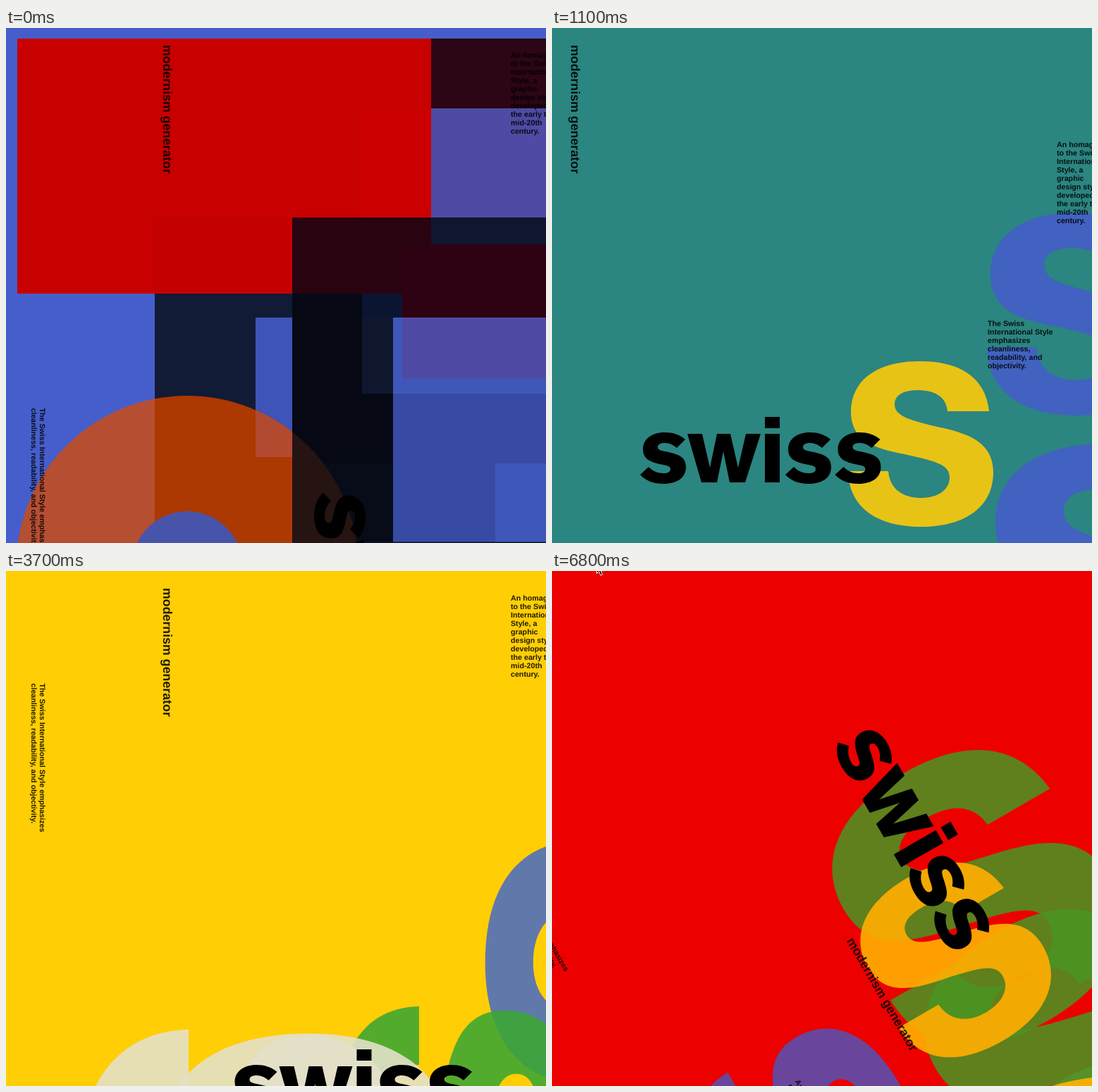
Animation, 766 px wide and 731 px high, one loop 6900 ms. Source, as an HTML page:

```html
<!DOCTYPE html>
<html lang="en">
<head>
<meta charset="utf-8">
<title>modernism generator</title>
<style>
html, body { margin: 0; width: 100%; height: 100%; overflow: hidden; }
svg { display: block; width: 100vw; height: 100vh; }
text {
  font: 700 10.68px "Liberation Sans", Arial, sans-serif;
  fill: #000; fill-opacity: .87; text-rendering: geometricPrecision; white-space: pre;
}
.title { font-size: 17.8px; }
.fade use { fill: inherit; }
</style>
</head>
<body>
<svg id="stage" viewBox="0 0 766 731" preserveAspectRatio="none">
  <defs>
    <path id="cap" d="M620 544C615 497 580 473 522 473C460 473 424 501 424 545C424 586 458 597 500 605C545 615 564 620 564 638C564 655 548 667 524 667C496 667 479 653 477 629L420 629C421 680 460 708 524 708C588 708 626 678 626 631C626 590 594 577 556 568C507 557 486 551 486 534C486 522 497 514 518 514C543 514 559 523 561 544Z"/>
    <path id="low" d="M64 10C56 3 46 0 35 0C16 0 4 10 4 24C4 38 15 42 28 45C39 47 43 48 43 52C43 56 39 58 33 58C25 58 18 55 12 49L0 60C8 69 20 73 33 73C53 73 65 64 65 49C65 34 53 31 40 28C30 26 25 25 25 21C25 17 29 15 35 15C42 15 47 18 52 22Z"/>
    <g id="word">
      <use href="#low" x="125" y="574"/>
      <path d="M192 576H213L224 624L234 576H253L264 624L275 576H296L274 645H252L243 601L234 645H212ZM302 576H323V645H302ZM302 552H323V568H302Z"/>
      <use href="#low" x="331" y="574"/>
      <use href="#low" x="401.500" y="574"/>
    </g>
  </defs>
</svg>
<script>
const LOOP = 6900;
const stage = document.getElementById('stage');

const homage = ['An homage', 'to the Swiss', 'International', 'Style, a', 'graphic',
  'design style', 'developed in', 'the early to', 'mid-20th', 'century.'];
const homageWide = ['An homage to the Swiss International Style, a',
  'graphic design style developed in the early to mid-', '20th century.'];
const about = ['The Swiss', 'International Style', 'emphasizes', 'cleanliness,',
  'readability, and', 'objectivity.'];
const aboutWide = ['The Swiss International Style emphasizes',
  'cleanliness, readability, and objectivity.'];

const rect = (x, y, r, b, fill) =>
  `<rect x="${x}" y="${y}" width="${r - x}" height="${b - y}" fill="${fill}"/>`;
const back = fill => rect(0, 0, 766, 731, fill);
const ess = (x, y, size, turn, fill, alpha = 1) =>
  `<use href="#cap" transform="translate(${x} ${y}) rotate(${turn}) scale(${size})" fill="${fill}" fill-opacity="${alpha}"/>`;
const word = (x, y, turn) =>
  `<use href="#word" role="img" aria-label="swiss" transform="translate(${x} ${y}) rotate(${turn}) translate(-157.5 -610.5)"/>`;
const para = (x, y, turn, lines) =>
  `<g transform="translate(${x} ${y}) rotate(${turn})">` +
  lines.map((line, i) => `<text y="${i * 12}">${line}</text>`).join('') + '</g>';
const title = (x, y) =>
  `<text class="title" transform="translate(${x} ${y}) rotate(90)">modernism generator</text>`;

// Overlapping blocks with a ring
function blocks() {
  const areas = [
    [16, 15, 603, 377, '#c80000'], [505, 114, 603, 269, '#cc0000'],
    [211, 269, 406, 377, '#c50000'],
    [603, 15, 766, 114, '#2c0516'], [603, 114, 766, 269, '#4f4aa3'],
    [406, 269, 603, 377, '#2a0310'], [603, 269, 766, 307, '#0f1630'],
    [211, 377, 406, 731, '#111b35'], [354, 411, 406, 609, '#3e54b8'],
    [406, 377, 549, 618, '#060914'], [406, 618, 549, 731, '#070c18'],
    [505, 377, 562, 411, '#0b1430'], [505, 411, 549, 519, '#0f172e'],
    [549, 411, 766, 731, '#4057ba'], [562, 307, 766, 411, '#2e0212'],
    [562, 411, 766, 498, '#4f4aa3'], [549, 519, 766, 618, '#374ba5'],
    [549, 618, 694, 731, '#374aa4'], [498, 729.5, 766, 731, '#0f1428']
  ];
  const bands = [
    [0, 500, 211, 731, '#b64e32'], [211, 500, 406, 731, '#ac3802'],
    [354, 500, 406, 609, '#b24a30'], [406, 500, 549, 731, '#261412']
  ];
  const ring = bands.map(([x, y, r, b, c], i) =>
    `<clipPath id="band${i}">${rect(x, y, r, b, c)}</clipPath>` +
    `<g clip-path="url(#band${i})"><circle cx="257" cy="764.5" r="160.5" fill="none" stroke="${c}" stroke-width="164"/></g>`);
  return back('#465ecb') + areas.map(a => rect(...a)).join('') +
    '<circle cx="257" cy="764.5" r="80" fill="#4854aa"/>' + ring.join('') +
    word(473.5, 692, 90) + title(222.5, 24) +
    para(716, 42, 0, homage) + para(48, 539.5, 90, aboutWide);
}

function fading() {
  return '<rect id="ground" width="766" height="731"/>' +
    `<g id="blue" class="fade">${ess(102.2, -318, 1.226, 0, '')}${ess(-34.6, -150, 1.565, 0, '')}</g>` +
    `<g id="gold" class="fade">${ess(0, 0, 1, 0, '')}</g>` +
    word(157.5, 610.5, 0) + title(27, 24) +
    para(716, 169, 0, homage) + para(618, 423, 0, about);
}

function yellow() {
  const pale = 'rgb(228,225,202)';
  return back('#ffce05') +
    ess(1855, -314, 1.66, 90, '#6178aa') +
    ess(1498, 9, 1.45, 90, 'rgb(60,167,52)', .88) +
    ess(1517, -189, 2, 90, pale, .89) +
    ess(-668.2, -336.8, 2.1, 0, pale, .89) +
    word(353, 737.5, 0) + title(222.5, 24) +
    para(716, 42, 0, homage) + para(48, 159.5, 90, aboutWide);
}

// One layout, turned as a whole
function tilted(turn, ground, green, greenAlpha, gold, goldAlpha, violet, extra = '') {
  return back(ground) + `<g transform="rotate(${turn} 407 529)">` +
    ess(996.7, 62.4, 1.3, 90, violet) +
    ess(-296.3, -453, 1.73, 0, green, greenAlpha) +
    ess(-296.3, -192, 1.73, 0, green, greenAlpha) +
    ess(-57.7, -42.6, 1.14, 0, gold, goldAlpha) +
    word(572.3, 313.6, 90) + title(418.3, 530.5) +
    para(50, 158, 90, aboutWide) + para(255, 667, 90, homageWide) +
    '</g>' + extra;
}

const corner = '<path d="M710 731Q735 713 766 703V731Z" fill="#55912a"/>' +
  '<path d="M709 731Q735 723 766 719V731Z" fill="#f5ae02"/>';
const pointer = '<path id="pointer" d="M.5 .5V14.500L3.700 11.500L6 17.200L8.500 16.200L6.200 10.700H10.500Z" fill="#000" stroke="#fff"/>';

const scenes = [
  [0, blocks()],
  [600, fading()],
  [3700, yellow()],
  [5100, tilted(-5, '#ffad00', 'rgb(24,163,42)', .9, 'rgb(255,203,4)', .94, '#666da0')],
  [5800, tilted(-30, '#ec0000', 'rgb(75,147,34)', .87, 'rgb(255,173,1)', .92, '#69469c', corner + pointer)]
];
stage.insertAdjacentHTML('beforeend',
  scenes.map(([, art]) => `<g class="scene">${art}</g>`).join(''));
const layers = [...document.querySelectorAll('.scene')];

const fades = {
  ground: [[600, 70, 94, 203], [750, 68, 96, 199], [900, 61, 110, 179], [1200, 34, 145, 102], [1400, 2, 164, 46]],
  blue: [[600, 70, 94, 203], [900, 69, 95, 198], [1200, 63, 99, 189], [1400, 63, 103, 183]],
  gold: [[600, 226, 185, 38], [900, 228, 188, 35], [1200, 232, 198, 15], [1400, 238, 202, 9]]
};
const spots = [[5800, 389, 552], [6400, 94, 19], [6800, 63, -11]];

const latest = (table, t) => table.reduce((found, row, i) => row[0] <= t ? i : found, 0);

function mix(keys, t) {
  const i = latest(keys, t);
  const from = keys[i], to = keys[i + 1] || from;
  const p = to === from ? 0 : (t - from[0]) / (to[0] - from[0]);
  return `rgb(${[1, 2, 3].map(k => Math.round(from[k] + (to[k] - from[k]) * p))})`;
}

function draw(t) {
  const now = latest(scenes, t);
  layers.forEach((layer, i) => layer.setAttribute('display', i === now ? 'inline' : 'none'));
  const step = Math.max(600, Math.floor(t / 100) * 100);
  for (const id in fades) document.getElementById(id).style.fill = mix(fades[id], step);
  const [, x, y] = spots[latest(spots, t)];
  document.getElementById('pointer').setAttribute('transform', `translate(${x} ${y})`);
}

const start = performance.now();
function tick() {
  draw((performance.now() - start) % LOOP);
  requestAnimationFrame(tick);
}
tick();
</script>
</body>
</html>
```
